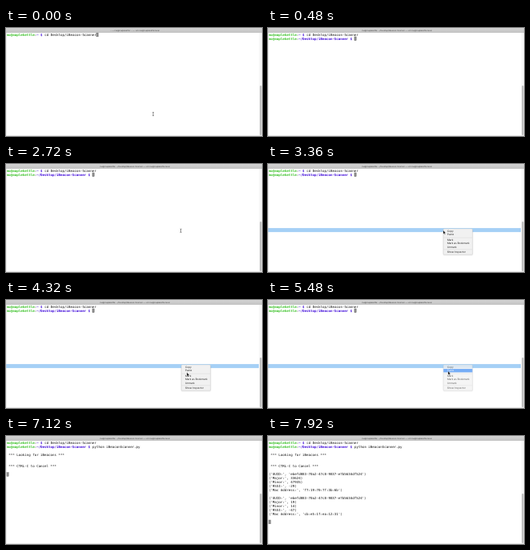
These frames come from a looping animation (320 by 135 pixels, 8 s). An HTML page:

```html
<!DOCTYPE html>
<html lang="en">
<head>
<meta charset="utf-8">
<title>Terminal session</title>
<style>
  html, body { margin: 0; width: 100%; height: 100%; overflow: hidden; background: #fff; }
  svg { display: block; width: 100%; height: 100%; }
  text { white-space: pre; text-rendering: geometricPrecision; }
  #term text { font: 4.135px "DejaVu Sans Mono", monospace; fill: #111; }
  #term .user { font-weight: bold; fill: #39c026; }
  #term .path { font-weight: bold; fill: #400bd9; }
  #title { font: 2.45px Inter, sans-serif; fill: #444; text-anchor: middle; }
  #menu text { font: 3.15px Inter, sans-serif; fill: #222; }
  #menu text.on { fill: #fff; }
</style>
</head>
<body>
<svg viewBox="0 0 320 135">
  <defs>
    <linearGradient id="bar" x2="0" y2="1">
      <stop stop-color="#d4d4d4"/><stop offset="1" stop-color="#c3c3c3"/>
    </linearGradient>
  </defs>
  <rect width="320" height="135" fill="#fff"/>
  <rect id="selection" y="80.1" width="316" height="5" fill="#a5d0f6"/>
  <g id="term"></g>
  <rect id="caret" width="2.3" height="4.8" fill="#8c8c8c" stroke="#666" stroke-width=".4"/>
  <rect x="316.5" y="5.7" width="3.5" height="130" fill="#f5f5f5"/>
  <rect x="317.4" y="72" width="2" height="62" rx="1" fill="#b5b5b5"/>
  <path d="M.2 5.7V134.6H320" fill="none" stroke="#ccc" stroke-width=".5"/>
  <rect width="320" height="5.7" fill="url(#bar)"/>
  <path d="M0 5.6H320" stroke="#aaa" stroke-width=".4"/>
  <text id="title" x="161" y="3.9"></text>
  <g id="menu">
    <rect x="218.6" y="81.6" width="37.8" height="33" rx="1.6" fill="#000" opacity=".08"/>
    <rect x="219.2" y="81" width="36.4" height="32.2" rx="1.2" fill="#f1f1f1" stroke="#c4c4c4" stroke-width=".4"/>
    <rect id="hover" x="219.3" width="36.2" height="4.3" fill="#3f8cf3"/>
    <path d="M219.4 92.1H255.4M219.4 106.8H255.4" stroke="#d6d6d6" stroke-width=".5"/>
  </g>
  <path id="arrow" d="M0 0V4.6L1.1 3.6 1.9 5.2 2.6 4.9 1.9 3.3H3.3Z" fill="#111" stroke="#fff" stroke-width=".3"/>
  <path id="beam" d="M-.9-2.2Q0-2.2 0-1.6 0-2.2 .9-2.2M0-1.8V1.8M-.9 2.2Q0 2.2 0 1.6 0 2.2 .9 2.2" fill="none" stroke="#444" stroke-width=".6"/>
</svg>
<script>
const LOOP = 8000, TOP = 6, ROW = 4.95, CHAR = 2.49, LEFT = 0.9;
const HOST = 'mo@maplekettle', DIR = '~/Desktop/iBeacon-Scanner';
const $ = id => document.getElementById(id);

function add(parent, tag, attrs, text = '') {
  const el = document.createElementNS('http://www.w3.org/2000/svg', tag);
  for (const key in attrs) el.setAttribute(key, attrs[key]);
  el.textContent = text;
  parent.append(el);
  return el;
}
const show = (el, on) => el.setAttribute('visibility', on ? 'visible' : 'hidden');
const move = (el, x, y) => el.setAttribute('transform', `translate(${x} ${y})`);

// Terminal output: each line appears at its own time.
const lines = [];
function print(time, row, text, col = 0) {
  const el = add($('term'), 'text', { x: LEFT + col * CHAR, y: TOP + row * ROW + 3.75 }, text);
  lines.push({ time, el });
  return el;
}
function prompt(time, row, dir) {
  const el = print(time, row, '');
  add(el, 'tspan', { class: 'user' }, HOST);
  add(el, 'tspan', {}, ':');
  add(el, 'tspan', { class: 'path' }, dir + ' $');
}
function beacon(time, row, major, minor, rssi, mac) {
  [
    "('UUID:', 'ebefd083-70a2-47c8-9837-e7b5634df524')",
    `('Major:', ${major})`,
    `('Minor:', ${minor})`,
    `('RSSI:', ${rssi})`,
    `('Mac Address:', '${mac}')`
  ].forEach((text, i) => print(time, row + i, text));
}

prompt(0, 0, '~');
print(0, 0, 'cd Desktop/iBeacon-Scanner', 19);
prompt(400, 1, DIR);
print(5720, 1, 'python iBeaconScanner.py', 43);
print(7120, 3, ' *** Looking for iBeacons ***');
print(7120, 6, ' *** CTRL-C to Cancel ***');
beacon(7880, 8, 33624, 47935, -29, 'f7:19:70:7f:3b:6b');
beacon(7920, 14, 19, 14, -47, 'cb:e5:1f:ea:12:31');

// Context menu
const items = [
  ['Copy', 85.1], ['Paste', 89.3], ['Mark', 96.2],
  ['Mark as Bookmark', 100.4], ['Unmark', 104.6], ['Show Inspector', 111.2]
].map(([label, y]) => ({ y, el: add($('menu'), 'text', { x: 224, y }, label) }));

// Caret stops: time, column, row
const carets = [
  [0, 45, 0], [360, 0, 1], [400, 43, 1], [5720, 67, 1],
  [6760, 0, 2], [7120, 0, 8], [7880, 0, 14], [7920, 0, 20]
];
// Mouse stops: time, x, y
const mouse = [
  [0, 184, 107.5], [2200, 184.6, 107], [2760, 219, 83], [3360, 219, 83],
  [3840, 226, 88.4], [4000, 226, 88.4], [4280, 226, 90.6], [4400, 226, 90.6],
  [4560, 225.6, 89], [4800, 225.6, 89], [5480, 225, 89], [5880, 226, 88.5], [LOOP, 226, 88.5]
];

function mouseAt(t) {
  const i = mouse.findIndex(stop => stop[0] > t);
  const [t0, x0, y0] = mouse[i - 1], [t1, x1, y1] = mouse[i];
  const u = (t - t0) / (t1 - t0), e = u * u * (3 - 2 * u);
  return [x0 + (x1 - x0) * e, y0 + (y1 - y0) * e];
}

function draw(t) {
  for (const line of lines) show(line.el, t >= line.time);

  const [, col, row] = carets.filter(c => c[0] <= t).pop();
  move($('caret'), LEFT + col * CHAR, TOP + row * ROW);

  const title = t < 440 ? `~ — ${HOST}: ~` : `${HOST}: ${DIR}`;
  $('title').textContent = `${title} — ssh ${HOST}.local`;

  const [x, y] = mouseAt(t);
  const open = t >= 2840 && t < 5680;
  const moused = t < 360 || (t >= 2200 && t < 6760);
  move($('arrow'), x, y);
  move($('beam'), x, y);
  show($('arrow'), open);
  show($('beam'), moused && !open);
  show($('selection'), t >= 2800 && t < 5680);

  show($('menu'), open);
  $('menu').setAttribute('opacity', Math.min(1, Math.max(0, (5680 - t) / 280)));
  const blink = t >= 5280 && t < 5360;
  const hot = open && !blink && x > 219.8
    ? items.slice(0, 2).find(item => y > item.y - 3.2 && y < item.y + 1.1) : null;
  show($('hover'), hot);
  if (hot) $('hover').setAttribute('y', hot.y - 3.2);
  for (const item of items) {
    item.el.setAttribute('class', item === hot ? 'on' : '');
    // Children must inherit the menu's visibility.
    item.el.removeAttribute('visibility');
  }
}

const start = performance.now();
function tick() {
  draw((performance.now() - start) % LOOP);
  requestAnimationFrame(tick);
}
tick();
</script>
</body>
</html>
```
